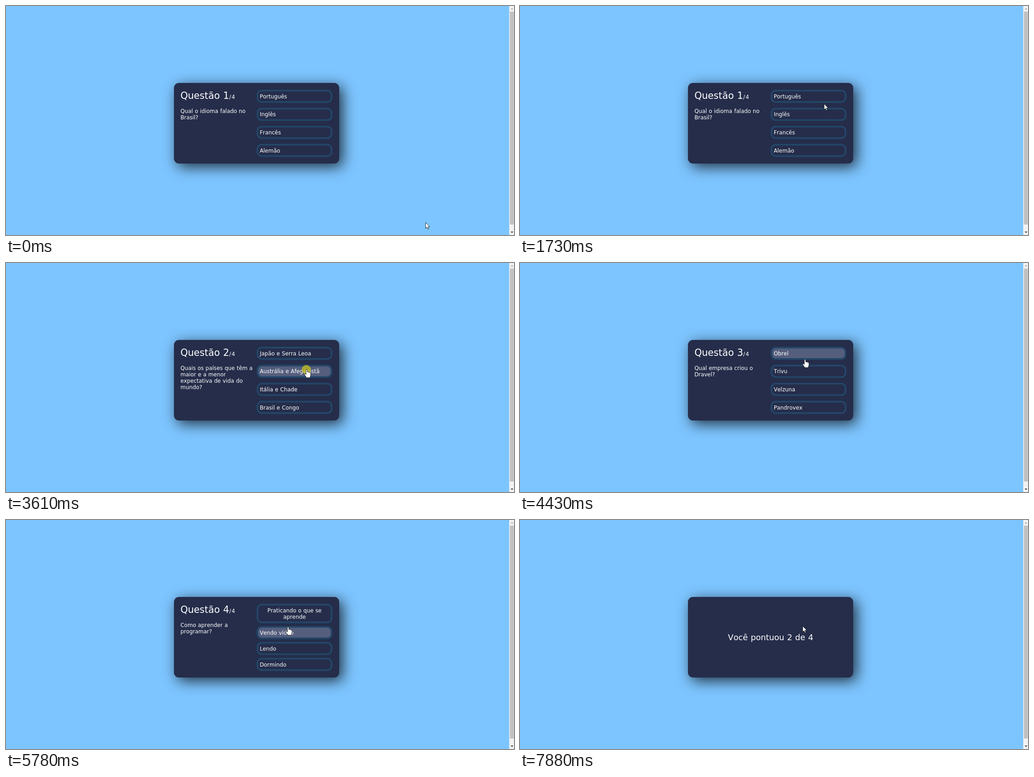
These frames come from a looping animation (1113x503 px, 8000 ms). An HTML page:

```html
<!DOCTYPE html>
<html lang="pt">
<head>
<meta charset="utf-8">
<title>Quiz</title>
<style>
  html, body { margin: 0; width: 100%; height: 100%; overflow: hidden; background: #7dc5ff; }
  .card {
    position: absolute; left: 368px; top: 169px; width: 362px; height: 177px;
    border-radius: 11px; background: #252d4a;
    box-shadow: 7.4px 7.4px 31px rgba(0, 0, 0, .75);
  }
  svg { position: absolute; left: 0; top: 0; display: block; }
  text {
    font: 11.82px "DejaVu Sans", Verdana, sans-serif; fill: #fff;
    font-kerning: none; word-spacing: .034em;
  }
  .head { font-size: 20.7px; }
  .total { font-size: 11.82px; letter-spacing: 1.3px; }
  .score { font-size: 17.73px; }
  .mid { text-anchor: middle; }
  .option { fill: #252d4a; stroke: #234668; stroke-width: 3.7px; }
  .option.hover { fill: #555e7d; }
  .cursor { fill: #fff; stroke: #000; stroke-width: .8px; stroke-linejoin: round; }
</style>
</head>
<body>
<div class="card"></div>
<svg width="1113" height="503" viewBox="0 0 1113 503">
  <g id="scrollbar">
    <rect x="1102.5" width="10.5" height="503" fill="#f1f1f1"/>
    <rect x="1104" y="12.3" width="8.6" height="467.7" fill="#c1c1c1"/>
    <path d="M1105.6 7.6L1108.6 4.6 1111.6 7.6Z" fill="#a3a3a3"/>
    <path d="M1105.6 495.5L1108.6 498.5 1111.6 495.5Z" fill="#303030"/>
  </g>
  <g id="content"></g>
  <circle id="click" cx="-1" r="10" fill="#c5c01f" opacity=".75"/>
  <path id="arrow" class="cursor" d="M.4 .4V13.4L3.3 10.7 5.2 15.2 7.3 14.3 5.4 9.9H9.4Z"/>
  <path id="hand" class="cursor" d="M-1.5 1.2C-1.5-.4 1.5-.4 1.5 1.2V5.5C2 4.8 3.9 4.9 4.1 6.1 4.8 5.4 6.3 5.7 6.5 6.9 7.5 6.5 8.6 7.1 8.6 8.3V12C8.6 14 7.2 15 7.2 18H-.8C-.8 16-5 12.2-5 10.3-5 9-3.6 8.7-2.8 9.6L-1.5 11Z"/>
</svg>
<script>
const LOOP = 8000;
const SAMPLE = 70;
const LINE = 14;
const BORDER = 3.7;
const LEFT = 382.2;
const PANEL = { x: 549.2, y: 184, w: 165.8, h: 147.5 };

// Each question is answered by a click that lasts from `press` to `done`.
const questions = [
  { press: 2140, done: 2300, ask: ["Qual o idioma falado no", "Brasil?"],
    options: [["Português"], ["Inglês"], ["Francês"], ["Alemão"]] },
  { press: 3610, done: 3740, ask: ["Quais os países que têm a", "maior e a menor", "expectativa de vida do", "mundo?"],
    options: [["Japão e Serra Leoa"], ["Austrália e Afeganistã"], ["Itália e Chade"], ["Brasil e Congo"]] },
  { press: 4770, done: 4830, ask: ["Qual empresa criou o", "Dravel?"],
    options: [["Obrel"], ["Trivu"], ["Velzuna"], ["Pandrovex"]] },
  { press: 6250, done: 6390, ask: ["Como aprender a", "programar?"],
    options: [["Praticando o que se", "aprende"], ["Vendo vídeo"], ["Lendo"], ["Dormindo"]] }
];

// The mouse rests between strokes; each one eases out to its end point.
const HOME = { x: 919, y: 475 };
const strokes = [
  { start: 380, end: 520, x: 752, y: 445, ease: 1 },
  { start: 1250, end: 2000, x: 665.5, y: 208, ease: 3.3 },
  { start: 2750, end: 2890, x: 659, y: 234, ease: 1 },
  { start: 4000, end: 4770, x: 620, y: 205, ease: 1.65 },
  { start: 5560, end: 6250, x: 618, y: 240, ease: 4.3 },
  { start: 7050, end: 7260, x: 619, y: 231, ease: 1 },
  { start: 7750, end: 7880, x: 619, y: 232.5, ease: 1 }
];

const $ = id => document.getElementById(id);
const easeOut = (a, b, u, power) => b + (a - b) * (1 - u) ** power;

// Buttons share the panel height with equal gaps between them.
function layout(options) {
  const heights = options.map(lines => lines.length * LINE + 4 * BORDER);
  const gap = (PANEL.h - heights.reduce((a, b) => a + b)) / (options.length - 1);
  let y = PANEL.y;
  return options.map((lines, i) => {
    const box = { lines, y, h: heights[i] };
    y += heights[i] + gap;
    return box;
  });
}
questions.forEach(q => q.boxes = layout(q.options));

// Progress of a stroke, held between the samples of the recording.
function progress(s, t) {
  const gaps = Math.round((s.end - s.start) / SAMPLE);
  const k = Math.floor((t - s.start) / (s.end - s.start) * gaps + 1e-6);
  return Math.min(1, (k + 1) / (gaps + 1));
}

// The path bows because x settles before y.
function mouseAt(t) {
  return strokes.filter(s => s.start <= t).reduce((from, s) => {
    const u = progress(s, t);
    return { x: easeOut(from.x, s.x, u, s.ease * 1.5), y: easeOut(from.y, s.y, u, s.ease) };
  }, HOME);
}

function hoverIndex(q, m) {
  if (!q || m.x < PANEL.x || m.x > PANEL.x + PANEL.w) return -1;
  return q.boxes.findIndex(b => m.y >= b.y && m.y <= b.y + b.h);
}

const label = (x, y, str, cls = "") => `<text class="${cls}" x="${x}" y="${y}">${str}</text>`;
const lines = (list, x, y, cls) => list.map((s, i) => label(x, y + i * LINE, s, cls)).join("");

function optionMarkup(box, hovered) {
  const wrapped = box.lines.length > 1;
  const x = wrapped ? PANEL.x + PANEL.w / 2 : PANEL.x + 2 * BORDER - .6;
  const rect = `<rect class="option${hovered ? " hover" : ""}" ` +
    `x="${PANEL.x + BORDER / 2}" y="${box.y + BORDER / 2}" ` +
    `width="${PANEL.w - BORDER}" height="${box.h - BORDER}" rx="9.2"/>`;
  return rect + lines(box.lines, x, Math.round(box.y + 18.8), wrapped ? "mid" : "");
}

function contentMarkup(q, hover) {
  if (!q) return label(549, 264, "Você pontuou 2 de 4", "score mid");
  const title = `Questão ${questions.indexOf(q) + 1}<tspan class="total">/4</tspan>`;
  return label(LEFT, 204, title, "head") + lines(q.ask, LEFT, 235) +
    q.boxes.map((b, i) => optionMarkup(b, i === hover)).join("");
}

function place(id, visible, m) {
  $(id).setAttribute("transform", `translate(${m.x} ${m.y})`);
  $(id).style.display = visible ? "" : "none";
}

let shown = "";
function draw(t) {
  const m = mouseAt(t);
  const q = questions.find(item => t < item.done);
  const hover = hoverIndex(q, m);
  const markup = contentMarkup(q, hover);
  if (markup !== shown) $("content").innerHTML = shown = markup;
  place("click", q && t >= q.press, m);
  place("arrow", hover < 0, m);
  place("hand", hover >= 0, m);
}

const begin = performance.now();
function tick() {
  draw((performance.now() - begin) % LOOP);
  requestAnimationFrame(tick);
}
tick();
</script>
</body>
</html>
```
